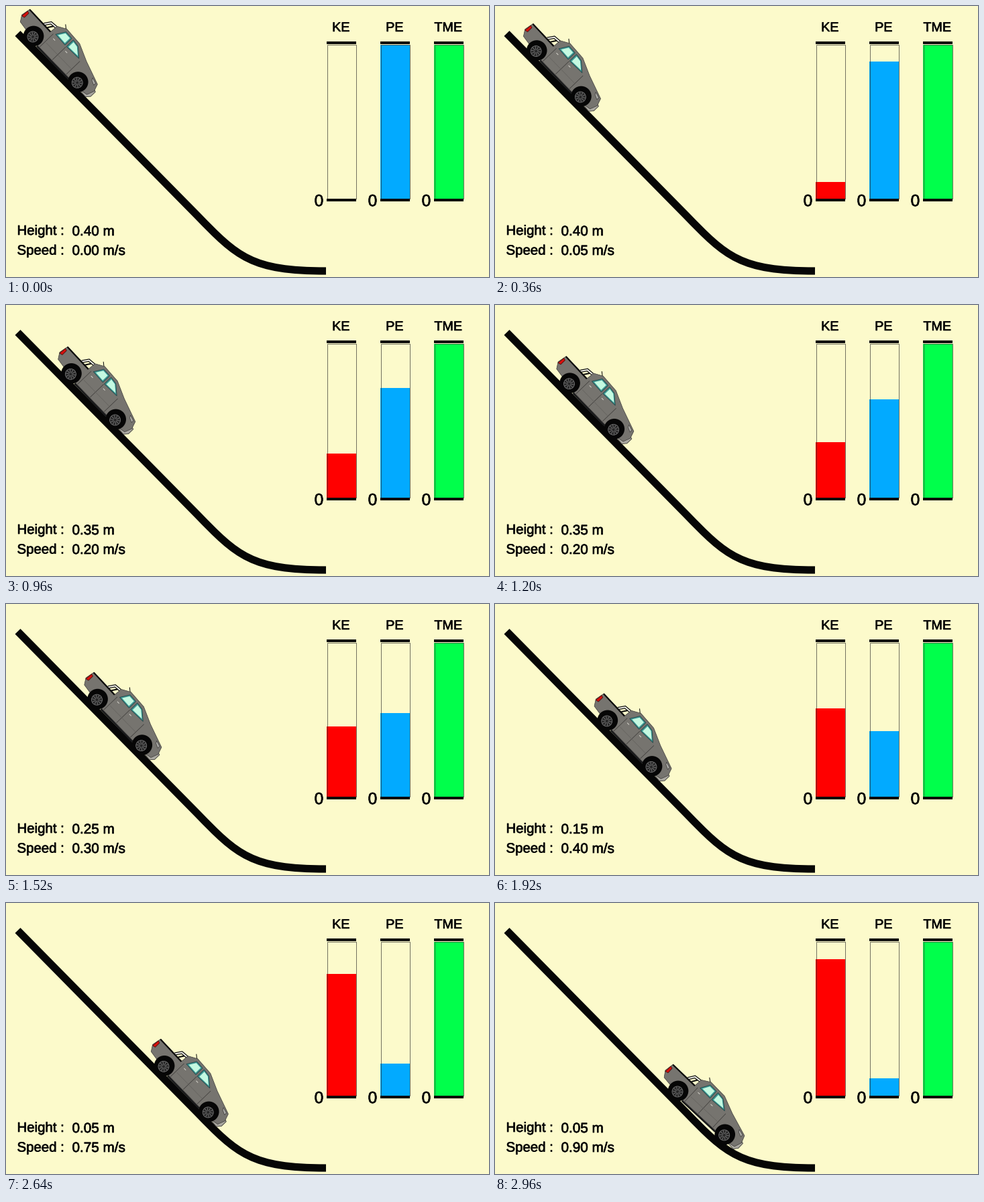
Write a matplotlib script that moves like this. It is 720 px wide and 405 px high and loops after 3 s.

```python
import numpy as np
import matplotlib.pyplot as plt
from matplotlib.animation import FuncAnimation
from matplotlib.patches import Circle, PathPatch, Polygon, Rectangle
from matplotlib.path import Path
from matplotlib.patheffects import withStroke
from matplotlib.transforms import Affine2D

W, H, DPI = 720, 405, 72  # at 72 dpi one point is one pixel
FRAMES, STEP = 75, 40
CREAM, INK = "#fcfacb", "#060606"
RED, BLUE, GREEN = "#ff0000", "#02aaff", "#00ff4b"
BODY, SEAM, RIM = "#76746f", "#3c3a38", "#7c7c7c"
TOP, BASE = 57.7, 288
AXLE = 95.3

plt.rcParams["font.family"] = "Liberation Sans"
fig = plt.figure(figsize=(W / DPI, H / DPI), dpi=DPI, facecolor=CREAM)
ax = fig.add_axes([0, 0, 1, 1])
ax.axis("off")
ax.set_xlim(0, W)
ax.set_ylim(H, 0)


def label(x, y, text, size=20.4, ha="left"):
    return ax.text(x, y, text, size=size, ha=ha, va="baseline", color=INK, zorder=5,
                   path_effects=[withStroke(linewidth=0.7, foreground=INK)])


def box(x, y, w, h, color, z=2):
    return ax.add_patch(Rectangle((x, y), w, h, fc=color, lw=0, zorder=z))


def gauge(x, name, color):
    fill = box(x, TOP, 43.5, BASE - TOP, color)
    ax.add_patch(Rectangle((x + 0.5, TOP), 43, BASE - TOP, fill=False,
                           ec="#3a3a34", lw=0.7, zorder=3))
    box(x, 52.6, 44, 4.4, INK, 4)
    box(x, BASE, 44, 4.3, INK, 4)
    label(x + 21.3, 38, name, 19.7, "center")
    label(x - 11.5, 299, "0", 24.5, "center")
    return fill


def set_level(bar, top):
    bar.set_y(top)
    bar.set_height(BASE - top)


# Ramp: a straight slope easing into level ground
ramp = Path([(17.5, 41), (285, 313), (345, 375), (366, 396), (477, 396)],
            [Path.MOVETO, Path.LINETO] + [Path.CURVE4] * 3)
ax.add_patch(PathPatch(ramp, fill=False, ec=INK, lw=11.2, capstyle="butt", zorder=1))

# Energy bars and readouts
ke, pe, tme = (gauge(478 + 80 * k, name, color) for k, (name, color)
               in enumerate([("KE", RED), ("PE", BLUE), ("TME", GREEN)]))
label(16.5, 342, "Height :")
label(16.5, 371.5, "Speed :")
height_text = label(98.5, 343, "", 20.7)
speed_text = label(98.5, 372, "", 20.7)

# Truck, in local units: rear axle at the origin, y up
pose = Affine2D()
truck = pose + ax.transData


def part(points, fc, ec=SEAM, lw=0.7, z=10):
    ax.add_patch(Polygon(points, closed=True, fc=fc, ec=ec, lw=lw,
                         joinstyle="round", transform=truck, zorder=z))


def stroke(points, color=SEAM, lw=0.7, z=12):
    ax.add_patch(PathPatch(Path(points), fill=False, ec=color, lw=lw,
                           transform=truck, zorder=z))


def disc(x, y, r, fc, ec="none", lw=0, z=13):
    ax.add_patch(Circle((x, y), r, fc=fc, ec=ec, lw=lw, transform=truck, zorder=z))


def wheel(x):
    disc(x, 1.5, 15.3, INK)
    disc(x, 0, 13.3, INK)
    disc(x, 0, 8, "#262626", RIM, 0.8, 14)
    for a in np.arange(10) * np.pi / 5:
        spoke = np.array([np.cos(a), np.sin(a)])
        stroke([(x, 0) + 2 * spoke, (x, 0) + 7.5 * spoke], RIM, 0.8, 15)


def window(pane):
    part(pane, "#3f9995", "#24494a", 0.9, 12)
    mid = np.mean(pane, axis=0)
    part(mid + (np.array(pane) - mid) * 0.74, "#c4f9e1", "none", 0, 13)


def build_truck():
    # roll bar and antenna
    bar = [(-2, 25), (4, 34), (14, 35)]
    stroke(bar, INK, 4.4, 9)
    stroke(bar, "#f0efe8", 2, 9.1)
    stroke([(5, 25), (10, 33)], INK, 2, 9.2)
    stroke([(20.5, 48), (27, 43)], INK, 1, 9)

    # sill, bumper and shell
    stroke([(14, -5), (82, -5)], "#17181a", 3.5, 9)
    part([(106, -5), (119, -6), (124, 0), (124, 10), (116, 12)], "#aaa8a1", "#33322f", 0.8, 9.5)
    part([(-32.5, 25.5), (-35, 11), (-29, 2), (16, -4), (108, -4), (118, -2), (122, 9),
          (118, 20), (82, 32), (56, 43), (27, 44.5), (14, 37), (13, 25)], BODY)

    # seams and handles
    stroke([(-32.5, 24.8), (13, 24)], INK, 2)
    for x in (18, 45, 75):
        stroke([(x, 25), (x, -3)])
    stroke([(20, 8), (74, 8)], "#65635f")
    for x in (23, 49):
        stroke([(x, 20), (x + 4, 20)], "#d6d4cc", 1)

    window([(21, 27), (42, 26), (42, 40), (29, 40.5)])
    window([(45.5, 26), (71, 27), (57, 38.5), (45.5, 40)])

    # lamps and wheels
    part([(-33, 21), (-29.5, 20), (-29.5, 11), (-34, 10)], "#d8100c", "#4a0f0c", 0.8, 12)
    part([(106, 21.5), (115, 19), (115, 15), (108, 18)], "#a9a9a5", z=12)
    wheel(0)
    wheel(AXLE)


build_truck()

# Key poses where the truck changes pace, time in ms
KNOTS = [0, 1200, 2320, 2960]


def keyed(t, *values):
    return np.interp(t, KNOTS, values)


def by_twentieths(value):
    return round(value * 20) / 20


def update(i):
    t = i * STEP
    x = keyed(t, 40, 110.5, 198, 272)
    y = 46 + 1.017 * (x - 40)
    tilt = 46 - 3 * np.clip((t - 2640) / 320, 0, 1)  # levels off entering the bend
    pose.clear().scale(1, -1).rotate_deg(tilt).translate(x, y)

    moved = 0.069 * t
    set_level(ke, BASE - moved)
    set_level(pe, TOP + moved)

    height = by_twentieths(keyed(t, 0.40, 0.33, 0.08, 0.05))
    speed = min(0.9, by_twentieths(keyed(t, 0, 0.22, 0.5, 1.03)))
    height_text.set_text(f"{height:.2f} m")
    speed_text.set_text(f"{speed:.2f} m/s")
    return ke, pe, height_text, speed_text


anim = FuncAnimation(fig, update, frames=FRAMES, interval=STEP, repeat=True,
                     repeat_delay=0, blit=False)
plt.show()
```
